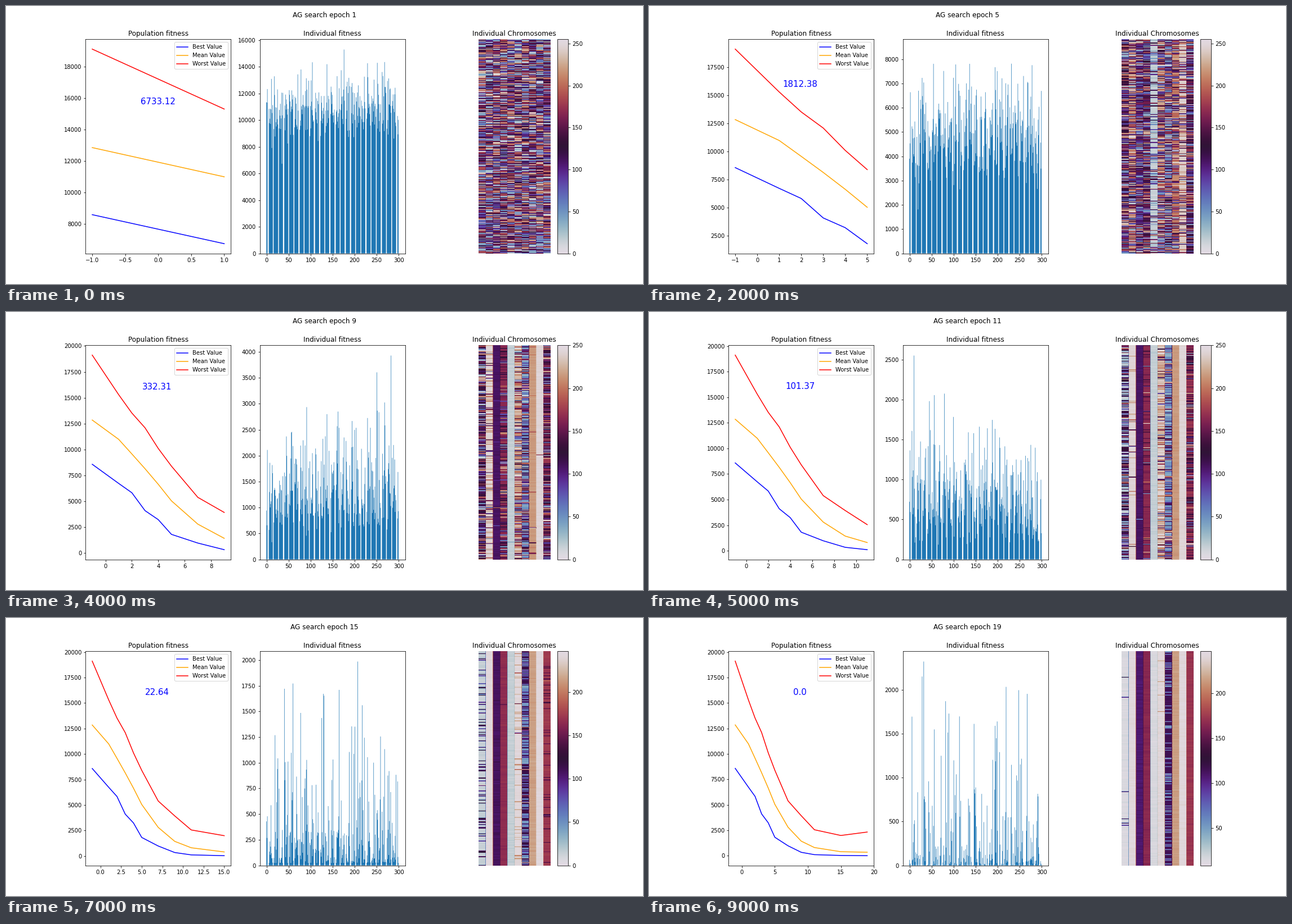
These frames come from a looping animation (1131x495 px, 9.5 s). A matplotlib script:

```python
import numpy as np
import matplotlib.pyplot as plt
from matplotlib.animation import FuncAnimation

EPOCHS = 19
POP = 300
DPI = 72

# Key points of the search; epoch 0 is the starting population.
KEYS = [0, 1, 2, 3, 4, 5, 7, 9, 11, 15, 19]
HISTORY = {
    "Best Value": ("blue", [8580, 6733.12, 5834.47, 4102.65, 3236.26, 1812.38,
                            972.82, 332.31, 101.37, 22.64, 0]),
    "Mean Value": ("orange", [12850, 10990, 9580, 8150, 6650, 5050,
                              2800, 1430, 800, 390, 340]),
    "Worst Value": ("red", [19120, 15304, 13530, 12100, 10111, 8400,
                            5386, 3929, 2549, 1986, 2323]),
}
BEST, MEAN, WORST = (np.interp(range(EPOCHS + 1), KEYS, points)
                     for _, points in HISTORY.values())

# Per gene: winning value, runner-up and the epoch when the winner takes over.
GENES = [(14, 126, 12.5), (243, 215, 8), (108, 95, 5.8), (165, 140, 9),
         (15, 28, 4.5), (242, 215, 12), (115, 48, 16), (215, 195, 6.3),
         (243, 220, 4.7), (172, 140, 11.5)]
GOAL, RIVAL, TAKEOVER = np.array(GENES).T

# The bars are sampled on a pixel grid finer than the stage.
BAR = .8
SPAN = POP - 1 + BAR
XLIM = -BAR / 2 - .05 * SPAN, POP - 1 + BAR / 2 + .05 * SPAN
COLUMNS = 358


def individual_fitness(epoch):
    """Spread above the best value that grows more skewed with each epoch."""
    rng = np.random.default_rng(epoch)
    best, mean, worst = BEST[epoch], MEAN[epoch], WORST[epoch]
    shape = max(.3, 8 - .5 * epoch)
    fitness = best + rng.gamma(shape, (mean - best) / shape, POP)
    over = fitness > .95 * worst
    fitness[over] = rng.uniform(mean, .95 * worst, over.sum())
    fitness[rng.integers(POP, size=2)] = best, worst
    return fitness


def gene_range(epoch):
    return (np.interp(epoch, [16, 18], [0, 8]),
            np.interp(epoch, [6, 9, 11, 12], [255, 250, 250, 247]))


def chromosomes(epoch):
    """Random genes that are taken over column by column."""
    rng = np.random.default_rng(100 + epoch)
    size = POP, len(GENES)
    age = (epoch - 1) / (EPOCHS - 1)
    share = 1 / (1 + np.exp(7 * (1 - epoch / TAKEOVER)))
    winner = GOAL + rng.normal(0, 2, size)
    rival = RIVAL + rng.normal(0, 22 - 18 * age, size)
    genes = rng.uniform(0, 255, size)
    genes = np.where(rng.random(size) < 1.1 * age, rival, genes)
    genes = np.where(rng.random(size) < share, winner, genes)
    return np.clip(genes, *gene_range(epoch))


def draw_history(ax, epoch):
    x = [-1, *range(1, epoch + 1)]
    for (label, (color, _)), data in zip(HISTORY.items(), (BEST, MEAN, WORST)):
        ax.plot(x, data[:epoch + 1], color=color, label=label)
    ax.annotate(str(round(float(BEST[epoch]), 2)),
                (.49 * (epoch - 1), .8 * WORST[0]), xytext=(0, 9),
                textcoords="offset points", ha="center", color="blue",
                fontsize=15)
    ax.legend(loc="upper right")
    ax.set_title("Population fitness")


def draw_fitness(ax, epoch):
    edges = np.linspace(*XLIM, COLUMNS + 1)
    centers = (edges[:-1] + edges[1:]) / 2
    nearest = np.clip(np.round(centers), 0, POP - 1).astype(int)
    covered = abs(centers - nearest) <= BAR / 2
    heights = np.where(covered, individual_fitness(epoch)[nearest], 0)
    ax.stairs(heights, edges, fill=True, snap=False)
    ax.set(xlim=XLIM, ylim=(0, 1.05 * WORST[epoch]),
           title="Individual fitness")


def draw_chromosomes(ax, epoch):
    low, high = gene_range(epoch)
    wide = np.repeat(chromosomes(epoch), 10, axis=1)
    image = ax.imshow(wide, cmap="twilight", vmin=low, vmax=high)
    ax.axis("off")
    ax.set_title("Individual Chromosomes")
    fig.colorbar(image, ax=ax)


def update(frame):
    epoch = frame + 1
    fig.clear()
    fig.suptitle(f"AG search epoch {epoch}")
    panels = fig.subplots(1, 3)
    for draw, ax in zip((draw_history, draw_fitness, draw_chromosomes), panels):
        draw(ax, epoch)
    return []


fig = plt.figure(figsize=(1131 / DPI, 495 / DPI), dpi=DPI)
anim = FuncAnimation(fig, update, frames=EPOCHS, interval=500, repeat=True,
                     repeat_delay=0, init_func=lambda: [])
plt.show()
```
